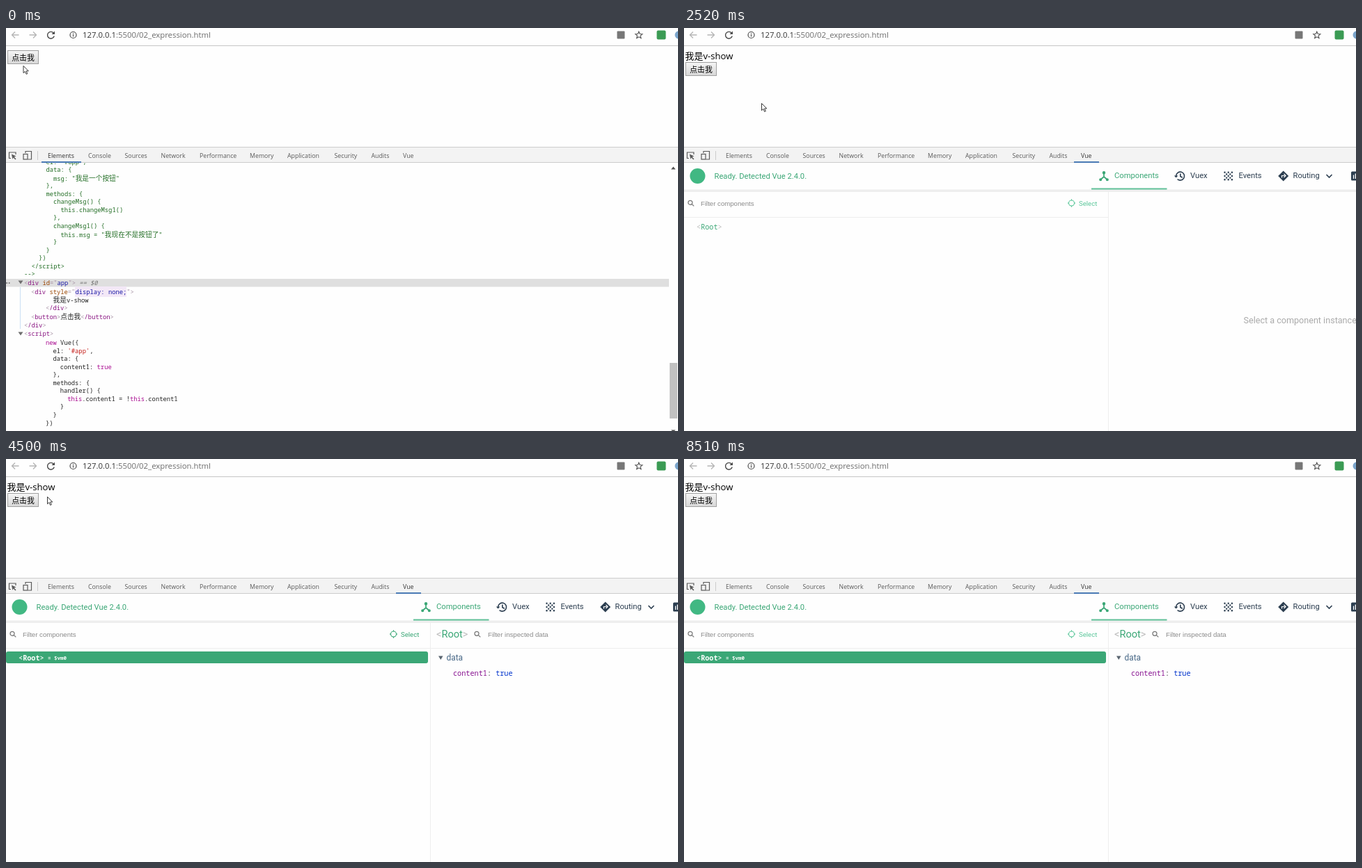
Animation, 965 px wide and 580 px high, one loop 8970 ms. Source, as an HTML page:

```html
<!DOCTYPE html>
<html lang="zh-CN">
<head>
<meta charset="utf-8">
<title>v-show</title>
<style>
html, body { margin: 0; width: 100%; height: 100%; overflow: hidden; background: #fff; }
#stage { position: relative; width: 965px; height: 580px; overflow: hidden; background: #fefefe; }
#stage div, #stage svg { position: absolute; }
.layer { left: 0; top: 0; width: 965px; height: 580px; }
.t { white-space: pre; line-height: 12px; }
.ui { font: 8.8px/12px "Open Sans", sans-serif; color: #5a5a5a; }
.page { font: 13.1px/16px "Open Sans", sans-serif; color: #000; }
.code { font: 8.8px/12px "Noto Sans Mono", monospace; color: #222; }
.rob { font: 11.2px/12px Roboto, sans-serif; color: #2c3e50; }
.hint { font: 9.65px/12px "Liberation Sans", Arial, sans-serif; color: #8a8a8a; }
.vm { font: 10.2px/12px "Noto Sans Mono", monospace; color: #3ba776; }
.z { font-family: "Noto Sans CJK SC", "Noto Sans CJK JP", sans-serif; font-size: 9.7px; }
.page .z { font-size: 13px; }
.cm { color: #236e25; }
.code b { color: #881280; font-weight: 400; }
.code i { color: #994500; font-style: normal; }
.code u { color: #1a1aa6; text-decoration: none; }
.code s { color: #c41a16; text-decoration: none; }
.code em { color: #aa0d91; font-style: normal; }
.code small { color: #a894a6; font-size: inherit; }
#btn { left: 2px; top: 32px; width: 43px; height: 18px; border: 1px solid #a0a0a0;
  background: linear-gradient(#f4f4f4, #d8d8d8); text-align: center; color: #000;
  font: 10.9px/18px "Noto Sans CJK SC", "Noto Sans CJK JP", sans-serif; white-space: nowrap; }
#btn.down { background: linear-gradient(#d4d4d4, #ececec); }
#tint { left: 0; top: 32px; width: 965px; height: 36px; background: rgba(104,182,255,.35); }
#tint div { left: 595px; top: 12px; width: 31px; height: 13px; border-radius: 2px; background: #70b8fd;
  color: #fff; font: 7px/13px "Liberation Serif", serif; text-align: center; }
#row { left: 0; top: 276.5px; width: 606px; height: 17.5px; border-radius: 3px; background: #3ba776; }
#under { top: 192px; height: 2px; background: #4a7ab5; }
</style>
</head>
<body>
<div id="stage">
  <div class="layer" id="page">
    <div id="btn">点击我</div>
    <div id="tint"><div>‹Root›</div></div>
  </div>

  <div class="layer" id="elements">
    <svg class="layer">
      <rect y="361" width="952" height="11.500" fill="#dfdfdf"/>
      <path d="M20.500 373v60" stroke="#cfe2f6" stroke-width="1.200"/>
      <g fill="#6e6e6e">
        <path d="M17.500 363.500h7l-3.500 5zM17.500 437.500h7l-3.500 5z"/>
        <circle cx="1.200" cy="367" r="1"/><circle cx="4.600" cy="367" r="1"/>
      </g>
      <path d="M955 203.500h6.500l-3.200-4z" fill="#505050"/>
      <path d="M955 578.500h6.500l-3.200 3z" fill="#505050"/>
      <rect x="953" y="482" width="11" height="80" fill="#c1c1c1"/>
    </svg>
  </div>

  <div class="layer" id="vue">
    <svg class="layer">
      <circle cx="19.500" cy="213" r="11" fill="#41b883"/>
      <path d="M0 234.200h965" stroke="#eee" stroke-width="3.500"/>
      <path d="M585 231.500h108.500" stroke="#5fbf97" stroke-width="2"/>
      <path d="M609.500 236v344M0 272.500h609" stroke="#eee"/>
      <g fill="#3ba776" stroke="#3ba776" stroke-width="1.700">
        <path d="M603 209v5l-4.500 4M603 214l4.500 4" fill="none"/>
        <circle cx="603" cy="208.300" r="1.400"/><circle cx="598.200" cy="218.300" r="1.200"/><circle cx="607.800" cy="218.300" r="1.200"/>
      </g>
      <g stroke="#2c3e50" stroke-width="1.600" fill="none">
        <path d="M706.600 213a6 6 0 1 1 2 4.600M712.800 209.500v4l3 1.800"/>
        <path d="M922.500 211l4 4 4-4"/>
      </g>
      <path d="M703.800 212.500h5.600l-2.800 3z" fill="#2c3e50"/>
      <g id="grain" fill="#2c3e50"></g>
      <path d="M860.700 205.500l7.500 7.500-7.500 7.500-7.500-7.500z" fill="#2c3e50"/>
      <path d="M858.500 215.500v-3h4M861.500 210l2.500 2.500-2.500 2.500" fill="none" stroke="#fff" stroke-width="1.200"/>
      <rect x="958" y="206.500" width="13" height="13" rx="1.500" fill="#2c3e50"/>
      <path d="M961.500 211.500v5.500M964.300 209.500v7.500" stroke="#fff" stroke-width="1.300"/>
      <path d="M11.300 253.400l3 3M12 251.300a3 3 0 1 1-6 0a3 3 0 1 1 6 0" fill="none" stroke="#777" stroke-width="1.200"/>
      <g id="aim" fill="none" stroke-width="1.100">
        <circle cx="556.500" cy="252" r="4"/>
        <path d="M556.500 246.300v2M556.500 255.700v2M550.800 252h2M560.200 252h2"/>
        <circle id="dot" cx="556.500" cy="252" r="1.600"/>
      </g>
    </svg>
    <div id="row"></div>
    <div class="layer" id="data">
      <svg class="layer">
        <path d="M610 272.500h355" stroke="#eee"/>
        <path d="M678.300 253.400l3 3M679 251.300a3 3 0 1 1-6 0a3 3 0 1 1 6 0" fill="none" stroke="#777" stroke-width="1.200"/>
        <path d="M621 283.500h6.500l-3.250 5.500z" fill="#5a6570"/>
      </svg>
    </div>
  </div>

  <div class="layer" id="chrome">
    <svg class="layer">
      <path d="M0 25.500h965" stroke="#c6c6c6"/>
      <g fill="none" stroke="#b5b5b5" stroke-width="1.300">
        <path d="M18.500 10h-10M13 5.500L8.500 10l4.500 4.500M33.500 10h10M39 5.500l4.500 4.500-4.500 4.500"/>
      </g>
      <g fill="none" stroke="#4c4c4c" stroke-width="1.400">
        <path d="M68.300 7.200a4.900 4.900 0 1 0 .9 4.300"/>
        <circle cx="96.500" cy="10" r="4.500" stroke-width="1.200"/>
        <path d="M96.500 9.300v3.200M96.500 7.300v1.200" stroke-width="1.200"/>
        <path id="star" stroke-width="1.100"/>
      </g>
      <path d="M70 4.500v4.500h-4.500z" fill="#4c4c4c"/>
      <rect x="877.500" y="4.500" width="11" height="11" rx="1" fill="#777"/>
      <rect x="934.500" y="3.500" width="13" height="13" rx="2" fill="#3b9b54"/>
      <circle cx="966" cy="10" r="5.500" fill="#7ba5cc"/>
      <rect y="172" width="965" height="21.500" fill="#f3f3f3"/>
      <path d="M0 171.500h965M0 193.500h965M45.500 177v13" stroke="#ccc"/>
      <g fill="none" stroke="#5a5a5a" stroke-width="1.200">
        <path d="M7 187.500H4.500v-8.500h9.500v3"/>
        <path d="M28 180v-2.500h8.500v11.500h-5"/><rect x="25" y="181.500" width="6" height="7.500"/>
      </g>
      <path d="M8 181.500l6.500 3-2.700 1 2.700 3-1.200 1-2.600-3-1.300 2.300z" fill="#5a5a5a"/>
    </svg>
    <div id="under"></div>
  </div>

  <svg id="cursor" width="12" height="16" viewBox="-1 -1 12 16" style="left:-1px;top:-1px">
    <path d="M.5.500v10.200l2.400-2.200 1.700 3.900 1.700-.7-1.700-3.800h3.200z" fill="#fff" stroke="#222" stroke-width=".9"/>
  </svg>
</div>
<script>
const $ = id => document.getElementById(id);
const LOOP = 8970;

// Places a line of text by its left edge and vertical middle.
function put(parent, x, y, html, cls, css = '') {
  const d = document.createElement('div');
  d.className = 't ' + cls;
  d.innerHTML = html.replace(/[\u4e00-\u9fff]+/g, '<span class="z">$&</span>');
  d.style.cssText = `left:${x}px;top:${y - (cls === 'page' ? 8 : 6)}px;${css}`;
  $(parent).append(d);
  return d;
}

const open = (name, rest = '') => `<small>&lt;</small><b>${name}</b>${rest}<small>&gt;</small>`;
const attr = (name, value) => ` <i>${name}</i><small>="</small>${value}<small>"</small>`;
const close = name => open('/' + name);

// Page and browser frame
const msg = put('page', 1.5, 40, '我是v-show', 'page');
$('page').prepend(msg);
put('chrome', 110, 10, '127.0.0.1<span style="color:#6c6c6c">:5500/02_expression.html</span>', 'ui', 'font-size:11.35px;color:#333');
const tabs = [['Elements', 60], ['Console', 118], ['Sources', 170.5], ['Network', 222.5], ['Performance', 278],
  ['Memory', 350], ['Application', 404], ['Security', 471.5], ['Audits', 524.5], ['Vue', 570]]
  .map(([name, x]) => put('chrome', x, 184, name, 'ui'));
$('star').setAttribute('d', 'M' + Array.from({ length: 10 }, (_, i) => {
  const r = i % 2 ? 2.4 : 5.3, a = i * Math.PI / 5;
  return `${(908.8 + r * Math.sin(a)).toFixed(2)} ${(10.4 - r * Math.cos(a)).toFixed(2)}`;
}).join('L') + 'z');

// Elements panel: [indent, text] per line
const comment = [[0, "el: '#app',"], [0, 'data: {'], [1, 'msg: "我是一个按钮"'], [0, '},'], [0, 'methods: {'],
  [1, 'changeMsg() {'], [2, 'this.changeMsg1()'], [1, '},'], [1, 'changeMsg1() {'],
  [2, 'this.msg = "我现在不是按钮了"'], [1, '}'], [0, '}'], [-1, '})'], [-2, '&lt;/script&gt;'], [-3, '--&gt;']];
comment.forEach(([n, s], i) => put('elements', 57.5 + n * 10.5, 192.5 + i * 11.57, s, 'code cm'));

put('elements', 26, 366.5, open('div', attr('id', '<u>app</u>')) +
  '<span style="color:#777;font-style:italic"> == $0</span>', 'code');
const hiddenDiv = put('elements', 36, 379.5, open('div', attr('style',
  '<u id="val" style="padding:1.5px 0">display: none;</u>')), 'code');
const shownDiv = put('elements', 36, 379.5, open('div', ' <i id="flash" style="padding:.5px 0">style</i>'), 'code');
put('elements', 67.5, 391, '我是v-show', 'code');
put('elements', 57, 402.5, close('div'), 'code');
put('elements', 36, 414.5, open('button') + '点击我' + close('button'), 'code');
put('elements', 26, 427.5, close('div'), 'code');
put('elements', 26, 440, open('script'), 'code');
[[0, '<em>new</em> Vue({'], [1, "el: <s>'#app'</s>,"], [1, 'data: {'], [2, 'content1: <em>true</em>'], [1, '},'],
  [1, 'methods: {'], [2, 'handler() {'], [3, '<em>this</em>.content1 = !<em>this</em>.content1'],
  [2, '}'], [1, '}'], [0, '})']]
  .forEach(([n, s], i) => put('elements', 57 + n * 10.4, 453 + i * 11.55, s, 'code'));

// Vue panel
put('vue', 43.5, 214, 'Ready. Detected Vue 2.4.0.', 'rob', 'color:#3ba776');
[['Components', 618], ['Vuex', 727], ['Events', 796.5], ['Routing', 874.5]].forEach(([s, x], i) =>
  put('vue', x, 213, s, 'rob', i ? '' : 'color:#3ba776'));
for (let i = 0; i < 25; i += 2) {
  const x = 776.5 + i % 5 * 2.6, y = 207.8 + Math.floor(i / 5) * 2.6;
  $('grain').innerHTML += `<circle cx="${x}" cy="${y}" r="1.2"/>`;
}
put('vue', 24, 252.5, 'Filter components', 'hint');
const select = put('vue', 567, 252.5, 'Select', 'rob', 'font-size:9.6px');
const rootName = put('vue', 18, 285.5, '', 'vm');
const ask = put('vue', 803.5, 420.5, 'Select a component instance to inspect.', 'rob', 'font-size:12.6px;color:#aaa');
put('data', 618, 251.5, '<span style="color:#bbb">&lt;</span>Root<span style="color:#bbb">&gt;</span>', 'rob',
  'font-size:14.6px;color:#3ba776');
put('data', 692, 252.5, 'Filter inspected data', 'hint');
put('data', 632.5, 285.5, 'data', 'rob', 'font-size:11.9px;color:#486887');
const field = put('data', 642, 307.5, '', 'vm');

// Screen updates come in bursts: start, end, count
const bursts = [[0, 0, 1], [120, 1020, 8], [1170, 2070, 7], [2220, 3150, 8], [3270, 3570, 3], [3840, 4770, 8],
  [5450, 5720, 3], [7000, 7480, 5], [7790, 8510, 6]];
const ticks = bursts.flatMap(([a, b, n]) => Array.from({ length: n }, (_, i) =>
  a + (i < n - 1 ? Math.floor(i * (b - a) / (n - 1) / 30) * 30 : b - a)));

// Pointer track: time, x, y
const path = [[0, 24.5, 54], [240, 24.5, 48], [630, 24.5, 48], [750, 60, 56], [1020, 230, 86], [1170, 262, 97],
  [1620, 576, 178], [1770, 577, 179], [2070, 557, 172], [2340, 97, 104], [2460, 111, 108], [3150, 505, 232],
  [3270, 530, 242], [3420, 556, 247], [3570, 556, 247], [3840, 420, 140], [3960, 138, 58], [4110, 72, 56],
  [4500, 59, 54], [4770, 31, 55], [5720, 31, 54.5], [7000, 31, 54.5], [7090, 31, 47], [7360, 31, 47], [7480, 31, 52],
  [7790, 80, 90], [8400, 880, 566], [LOOP, 880, 600]];

function cursorAt(t) {
  const i = Math.max(1, path.findIndex(p => p[0] >= t));
  const [t0, x0, y0] = path[i - 1], [t1, x1, y1] = path[i];
  const k = (t - t0) / (t1 - t0);
  return [x0 + (x1 - x0) * k, y0 + (y1 - y0) * k];
}

const within = (t, a, b) => t >= a && t < b;
const show = (el, on) => { el.style.display = on ? '' : 'none'; };
const paint = (c, s) => `<span style="color:${c}">${s}</span>`;

function draw(t) {
  const visible = within(t, 600, 5540) || t >= 7240;
  const vueTab = t >= 1770, picked = t >= 4230;

  show(msg, visible);
  $('btn').style.top = (visible ? 48.5 : 32) + 'px';
  $('btn').classList.toggle('down', within(t, 480, 600) || within(t, 5450, 5540) || within(t, 7120, 7240));
  show($('tint'), within(t, 3840, 4230));

  show($('elements'), !vueTab);
  show($('vue'), vueTab);
  tabs[0].style.color = vueTab ? '' : '#333';
  tabs[9].style.color = vueTab ? '#333' : '';
  $('under').style.left = (vueTab ? 560 : 51) + 'px';
  $('under').style.width = (vueTab ? 36 : 57) + 'px';

  show(hiddenDiv, !visible);
  show(shownDiv, visible);
  $('val').style.background = t < 240 ? '#f3e8f7' : '';
  const p = Math.min(1, Math.max(0, (t - 620) / 1120)), mix = 1 - (1 - p) ** 2.4;
  const rgb = [[158, 245], [54, 219], [153, 244]].map(([a, b]) => Math.round(a + (b - a) * mix));
  $('flash').style.background = p < 1 ? `rgb(${rgb})` : '';
  $('flash').style.color = `rgba(153,69,0,${Math.max(0, p * 2 - 1)})`;

  const green = within(t, 3400, 4600) ? '#3ba776' : '#5cc79b';
  select.style.color = green;
  $('aim').setAttribute('stroke', green);
  $('dot').setAttribute('fill', green);
  show($('dot'), within(t, 3570, 4230));

  show($('row'), picked);
  show($('data'), picked);
  show(ask, !picked);
  const edge = picked ? '#e3f3ec' : '#bbb';
  rootName.innerHTML = paint(edge, '&lt;') + 'Root' + paint(edge, '&gt;') +
    (picked ? '<span style="position:absolute;left:42px;font-size:7.5px;font-weight:700">= $vm0</span>' : '');
  rootName.style.color = picked ? '#fff' : '#3ba776';
  rootName.style.fontWeight = picked ? 600 : 500;
  field.innerHTML = paint('#881391', 'content1') + paint('#444', ': ') + paint('#03c', visible);

  const [x, y] = cursorAt(t);
  $('cursor').style.transform = `translate(${x}px,${y}px)`;
  show($('cursor'), t < 8510);
}

const start = performance.now();
let last = -1;
function frame() {
  const now = (performance.now() - start) % LOOP;
  const t = ticks.filter(k => k <= now).pop();
  if (t !== last) draw(last = t);
  requestAnimationFrame(frame);
}
frame();
</script>
</body>
</html>
```
